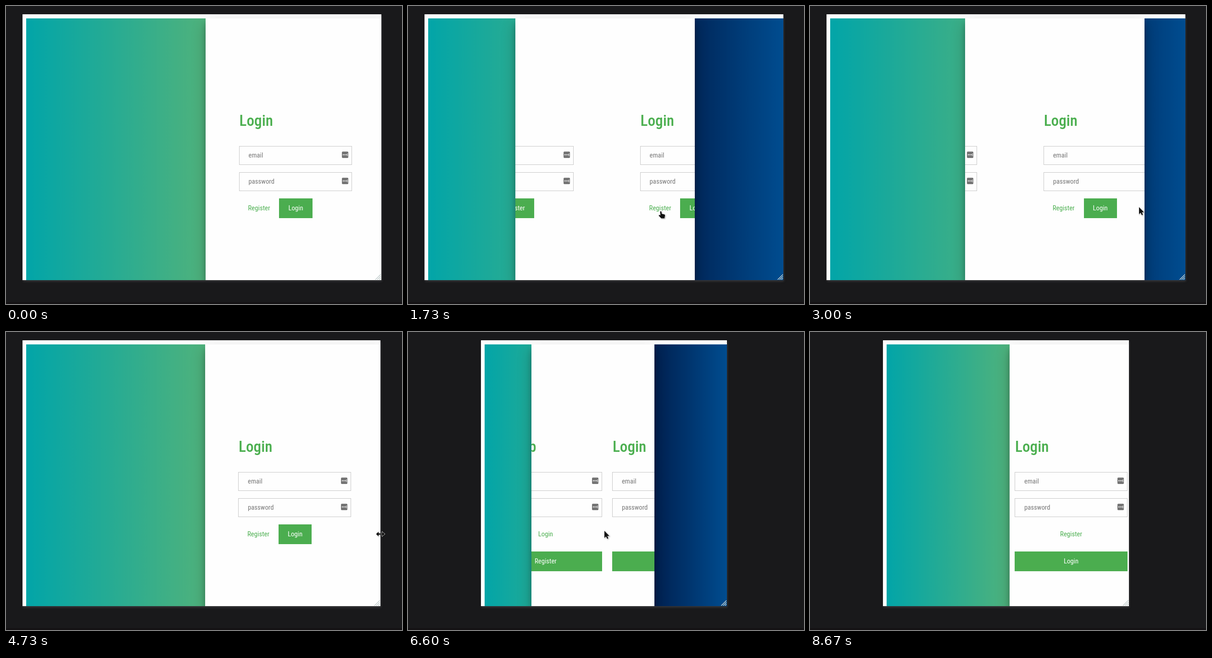
Recreate the animation shown at these times as an HTML page. Size 863 by 649 pixels, loop 8.99 s.

```html
<!DOCTYPE html>
<html lang="en">
<head>
<meta charset="utf-8">
<title>Sliding login panel</title>
<style>
  html, body { margin: 0; width: 100%; height: 100%; overflow: hidden; background: #19191b; }
  body { position: relative; font: 14.5px/39px "Roboto Condensed", Roboto, sans-serif; font-stretch: 75%; }
  div, svg, h1, p { position: absolute; margin: 0; box-sizing: border-box; white-space: nowrap; }
  #floor { left: 0; right: 0; top: 645px; bottom: 0; background: #141214; }
  #card { top: 18px; height: 579px; overflow: hidden; background: #fefefe; }
  #shade { top: 18px; height: 579px; box-shadow: 1px 3px 4px #353538; }
  #scene { left: 8px; top: 8.5px; bottom: 0; }
  #scene > div { top: 0; bottom: 0; width: 50%; }
  #green { left: 0; background: linear-gradient(90deg, #02a5a8, #4fb27c); }
  #blue { left: 50%; background: linear-gradient(90deg, #000428, #004e92); }
  #pane { overflow: hidden; background: #fefefe; }
  #cast { box-shadow: 0 14px 28px rgba(0,0,0,.25), 0 10px 10px rgba(0,0,0,.22); }
  .form { top: -26.5px; width: 246px; height: 640px; }
  h1, .head { font-size: var(--head, 33px); font-weight: 500; line-height: 40px; color: #4caf50; }
  h1 { left: 1px; top: 230px; }
  .text { font-size: var(--text, 14.5px); }
  .field { left: 0; width: 246px; height: 41px; padding-left: 20px; border: 1px solid #c6c6c6; color: #777; }
  .field svg { right: 7px; top: 11px; }
  .row { top: 419px; width: 246px; display: flex; }
  .row p { position: static; height: 43px; line-height: 43px; padding: 0 20px; text-align: center; color: #4caf50; }
  .row p + p { background: #4bad4f; color: #fff; }
  .narrow .row { flex-direction: column; gap: 16px; }
  #grip { right: 0; bottom: 0; }
  #cursor { left: 0; top: 0; overflow: visible; }
  #cursor path { stroke: #fff; stroke-width: 1.2; fill: #111; paint-order: stroke; filter: drop-shadow(1px 1px 1px rgba(0,0,0,.3)); }
</style>
</head>
<body>
<div id="floor"></div>
<div id="shade"></div>
<div id="card">
  <div id="scene">
    <div id="green"></div>
    <div id="blue"></div>
    <div id="cast"></div>
    <div id="pane"></div>
  </div>
  <svg id="grip" width="14" height="14" fill="none">
    <path d="M2 13L13 2M6 13L13 6M10 13L13 10" stroke="#fff"/>
    <path d="M1 13L13 1M5 13L13 5M9 13L13 9" stroke="#8fa3a3"/>
  </svg>
</div>
<svg id="cursor" width="1" height="1">
  <path id="arrow" d="M0 0V15.5L3.6 12.2 6 17.6 8.6 16.5 6.3 11.2H11Z"/>
  <path id="hand" d="M-1.6 1Q0-1 1.3 1L2 5.5 8 7Q9.6 7.6 9 10L8 15.5H1L-4.5 9.8Q-4.6 7.6-2.6 8L-.8 9Z"/>
  <path id="resize" d="M-9.5 0L-4-5V-1.4H4V-5L9.5 0 4 5V1.4H-4V5Z"/>
</svg>
<script>
const LOOP = 8990, STEP = 200 / 3, SLIDE = 800;
const $ = id => document.getElementById(id);

// start time and end state: 0 = login, 1 = sign up
const slides = [[1493, 1], [2637, 0], [6313, 1], [7400, 0]];
// time, card width, card left
const sizes = [[0, 782, 36], [4667, 782, 36], [4733, 780, 36], [4900, 744, 55],
  [5400, 595, 130], [5600, 556, 149], [5850, 536, 159]];
// time, x, y, shape from then on
const moves = [[130, 810, 330, "arrow"], [950, 556, 446, "hand"], [1100, 551, 447, "hand"],
  [1850, 551, 447, "arrow"], [2400, 155, 443, "hand"], [2660, 155, 443, "arrow"],
  [3000, 717, 438, "arrow"], [3500, 814, 448, "arrow"], [3800, 818, 455, "resize"],
  [4330, 816, 440, "resize"], [4740, 816, 440, "arrow"], [4900, 794, 441, "arrow"],
  [5400, 720, 444, "arrow"], [5850, 691, 444, "arrow"], [6150, 563, 441, "hand"],
  [6390, 563, 441, "arrow"], [6600, 428, 433, "arrow"], [6800, 300, 442, "hand"],
  [7430, 300, 442, "arrow"], [7900, 560, 30, "arrow"], [7940, 560, 30, ""]];

const icon = `<svg width="14" height="14"><rect width="14" height="14" rx="2" fill="#757575"/>
  <path d="M2 6h2v2H2zM5.3 6h2v2h-2zM8.6 6h2v2h-2zM11.6 4h1v6h-1z" fill="#fff"/></svg>`;
const field = (name, y) => `<div class="field text" style="top:${y}px">${name}${icon}</div>`;

function addForm(title, link, button) {
  const el = document.createElement("div");
  el.className = "form";
  el.innerHTML = `<h1>${title}</h1>${field("email", 305)}${field("password", 362)}
    <div class="row text"><p>${link}</p><p>${button}</p></div>`;
  $("pane").append(el);
  return el;
}
const signup = addForm("Sign Up", "Login", "Register");
const login = addForm("Login", "Register", "Login");

// choose a type size that suits the font at hand
function setSize(name, word, width) {
  const probe = document.createElement("div");
  probe.className = name;
  probe.style.fontSize = "100px";
  probe.textContent = word;
  document.body.append(probe);
  const size = 100 * width / probe.getBoundingClientRect().width;
  probe.remove();
  document.body.style.setProperty("--" + name, size.toFixed(2) + "px");
}
setSize("text", "password", 56.5);
setSize("head", "Login", 73.5);

// cubic-bezier(.25, .1, .25, 1)
function ease(x) {
  if (x <= 0) return 0;
  if (x >= 1) return 1;
  let lo = 0, hi = 1, s;
  const curve = (a, b) => 3 * a * (1 - s) ** 2 * s + 3 * b * (1 - s) * s * s + s ** 3;
  for (let i = 0; i < 24; i++) {
    s = (lo + hi) / 2;
    if (curve(.25, .25) < x) lo = s; else hi = s;
  }
  return curve(.1, 1);
}

function progress(t) {
  let p = 0;
  for (const [start, to] of slides) p += (to - p) * ease((t - start) / SLIDE);
  return p;
}

function sample(keys, t) {
  const i = keys.findLastIndex(k => k[0] <= t);
  if (i < 0) return null;
  const a = keys[i], b = keys[i + 1] || a;
  const f = b === a ? 0 : (t - a[0]) / (b[0] - a[0]);
  return [a[1] + (b[1] - a[1]) * f, a[2] + (b[2] - a[2]) * f, a[3]];
}

const px = (el, left, width) => {
  el.style.left = left + "px";
  if (width) el.style.width = width + "px";
};

function draw(t) {
  const [w, left] = sample(sizes, t).slice(0, 2).map(Math.round);
  const half = w / 2, p = progress(t);
  const paneX = half * (1 - p);
  const lag = (progress(t - 2) - p) * half;
  px($("card"), left, w);
  px($("shade"), left, w);
  px($("scene"), 8, w);
  px($("pane"), paneX);
  px($("cast"), paneX);
  px(signup, half / 2 - 123 - paneX + lag);
  px(login, half * 1.5 - 123 - paneX + lag);
  document.body.classList.toggle("narrow", w < 576);

  const c = sample(moves, t);
  for (const id of ["arrow", "hand", "resize"])
    $(id).style.display = c && c[2] === id ? "" : "none";
  if (c) $("cursor").style.transform = `translate(${c[0]}px, ${c[1]}px)`;
}

const begin = performance.now();
function tick() {
  const t = (performance.now() - begin) % LOOP;
  draw(Math.floor((t + 5) / STEP) * STEP);
  requestAnimationFrame(tick);
}
tick();
</script>
</body>
</html>
```
